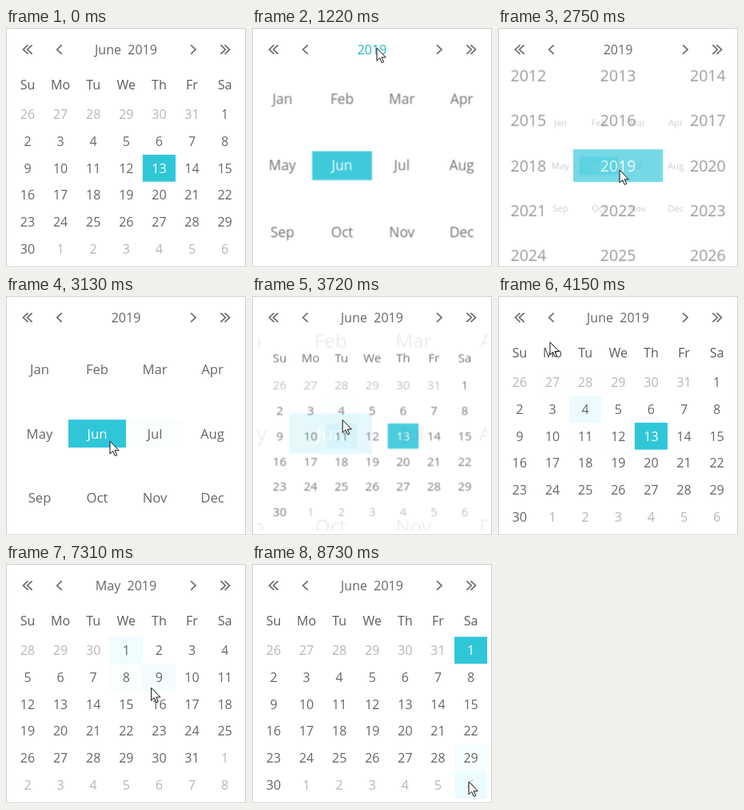
Animation, 300 px wide and 301 px high, one loop 9170 ms. Source, as an HTML page:

```html
<!DOCTYPE html>
<html lang="en">
<head>
<meta charset="utf-8">
<title>Calendar navigation</title>
<style>
  html, body { margin: 0; width: 100%; height: 100%; overflow: hidden; background: #fff; }
  svg { display: block; position: absolute; left: 0; top: 0; }
  text { font-family: "Open Sans", "Noto Sans", "Segoe UI", sans-serif; text-anchor: middle; white-space: pre; }
</style>
</head>
<body>
<svg id="stage" width="300" height="301" viewBox="0 0 300 301">
  <defs><clipPath id="body"><rect x="6" y="47" width="288" height="247"/></clipPath></defs>
  <rect width="300" height="301" fill="#fff"/>
  <rect x=".5" y=".5" width="299" height="299" fill="none" stroke="#d0d0d0"/>
  <g id="views" clip-path="url(#body)"></g>
  <g id="header" fill="none" stroke-width="1.6"></g>
  <path id="cursor" d="M0 0V16L3.7 12.6L6.3 18.5L8.7 17.5L6.1 11.8H11.2Z" fill="#fff" stroke="#111" stroke-linejoin="round"/>
</svg>
<script>
const LOOP = 9170, ZOOM = 400, LAST_HOVER = 8730;
const INK = '#666', MUTED = '#b6b6b6', ACCENT = '#2fc6d8', HOT = '#1fb4c4', HOVER = '#ebfbfe';
const CX = 150, CY = 172.6;
const $ = id => document.getElementById(id);

function el(parent, tag, attrs, label) {
  const node = document.createElementNS('http://www.w3.org/2000/svg', tag);
  for (const k in attrs) node.setAttribute(k, attrs[k]);
  if (label !== undefined) node.textContent = label;
  return parent.appendChild(node);
}
const set = (node, k, v) => node.setAttribute(k, v);
const show = (node, on) => set(node, 'visibility', on ? 'visible' : 'hidden');

function label(parent, x, y, size, str, fill) {
  return el(parent, 'text', { x, y: y + size * 0.357, 'font-size': size, fill }, str);
}

function makeView(title, singles) {
  return { title, singles, cells: [], g: el($('views'), 'g', { visibility: 'hidden' }) };
}
function addCell(view, x, y, w, h, size, str, color, key) {
  const box = el(view.g, 'rect', { x: x - w / 2, y: y - h / 2, width: w, height: h });
  const text = label(view.g, x, y, size, str, color);
  view.cells.push({ x, y, w, h, box, text, color, key });
}

function dayView(title, month) {
  const view = makeView(title, true);
  const colX = c => 27 + 41.1 * c;
  ['Su', 'Mo', 'Tu', 'We', 'Th', 'Fr', 'Sa'].forEach((d, c) => label(view.g, colX(c), 71.3, 16, d, '#5c5c5c'));
  const lead = new Date(Date.UTC(2019, month, 1)).getUTCDay();
  for (let i = 0; i < 42; i++) {
    const date = new Date(Date.UTC(2019, month, 1 - lead + i));
    const m = date.getUTCMonth(), d = date.getUTCDate();
    addCell(view, colX(i % 7), 108.2 + 33.8 * Math.floor(i / 7), 41.1, 33.8, 16, d,
      m === month ? INK : MUTED, m + '/' + d);
  }
  return view;
}
function gridView(title, singles, cols, rows, names) {
  const view = makeView(title, singles), w = 288 / cols, h = 242 / rows;
  names.forEach((name, i) => addCell(view, 6 + w * (i % cols + 0.5),
    CY + h * (Math.floor(i / cols) - (rows - 1) / 2), w, 35, 16.7, name, INK, name));
  return view;
}

const may = dayView('May  2019', 4);
const june = dayView('June  2019', 5);
const months = gridView('2019', true, 4, 3, 'Jan Feb Mar Apr May Jun Jul Aug Sep Oct Nov Dec'.split(' '));
const years = gridView('2012 - 2026', false, 3, 5, Array.from({ length: 15 }, (_, i) => String(2012 + i)));
const views = [may, june, months, years];

// Zoom direction: 1 goes up a level, -1 goes down, 0 switches at once.
const scenes = [
  [0, june, 0], [990, months, 1], [1900, years, 1], [2700, months, -1], [3520, june, -1],
  [4480, may, 0], [5700, june, 0], [6330, may, 0], [8120, june, 0]
];

// Pointer path: time, x, y.
const path = [
  [360, 180, 6], [800, 156, 25], [1630, 156, 25], [1760, 157, 16], [1900, 156, 25],
  [2220, 156, 25], [2620, 152, 178], [2780, 152, 178], [3130, 130, 182], [3370, 118, 180],
  [3580, 118, 180], [3760, 112, 150], [4020, 108, 138], [4150, 65, 58], [4390, 67, 26],
  [4600, 67, 26], [4980, 150, 8], [5340, 222, 14], [5600, 231, 27], [5890, 231, 27],
  [5930, 226, 28], [6250, 68, 28], [6400, 68, 28], [6730, 147, 102], [6940, 147, 102],
  [7840, 258, 246], [8060, 269, 246], [8410, 269, 246], [8550, 271, 273]
];

// Monotone cubic interpolation, so that holds stay still and turns are smooth.
const slope = (i, k) => (path[i + 1][k] - path[i][k]) / (path[i + 1][0] - path[i][0]);
function tangent(i, k) {
  if (i === 0 || i === path.length - 1) return 0;
  const a = slope(i - 1, k), b = slope(i, k);
  return a * b <= 0 ? 0 : 2 * a * b / (a + b);
}
function pointer(t) {
  if (t < path[0][0]) return null;
  const end = path[path.length - 1];
  if (t >= end[0]) return [end[1], end[2]];
  const i = path.findIndex(p => p[0] > t) - 1, d = path[i + 1][0] - path[i][0];
  const u = (t - path[i][0]) / d, v = 1 - u;
  return [1, 2].map(k => v * v * (1 + 2 * u) * path[i][k] + u * u * (3 - 2 * u) * path[i + 1][k]
    + d * u * v * (v * tangent(i, k) - u * tangent(i + 1, k)));
}

const chevron = (x, dir) => `M${x} 21.3l${6 * dir} 5.7l${-6 * dir} 5.7`;
const arrows = [
  { x: 6, d: chevron(27.5, -1) + chevron(32.7, -1) },
  { x: 47, d: chevron(69.7, -1), single: true },
  { x: 212, d: chevron(231, 1), single: true },
  { x: 253, d: chevron(268.3, 1) + chevron(273.5, 1) }
];
for (const a of arrows) a.node = el($('header'), 'path', { d: a.d });
const title = label($('header'), CX, 27, 16, '', INK);

const within = (p, x, y, w, h) => p && p[0] >= x && p[0] < x + w && p[1] >= y && p[1] < y + h;

function place(view, scale, opacity) {
  show(view.g, true);
  set(view.g, 'opacity', opacity);
  set(view.g, 'transform', `translate(${CX} ${CY}) scale(${scale}) translate(${-CX} ${-CY})`);
}

// Each hover tint follows the pointer with a short lag.
function hoverLevels(view, t, start) {
  const levels = new Map(), step = 10, tau = 200;
  const now = Math.min(t, LAST_HOVER);
  for (let lag = 0; lag < 900 && now - lag >= start; lag += step) {
    const p = pointer(now - lag);
    const hit = p && view.cells.find(c => within(p, c.x - c.w / 2, c.y - c.h / 2, c.w, c.h));
    if (hit) levels.set(hit, (levels.get(hit) || 0) + 1.6 * step / tau * Math.exp(-lag / tau));
  }
  return levels;
}

function paintCells(view, t, start) {
  const chosen = [t < 8120 ? '5/13' : '5/1', 'Jun', '2019'];
  const levels = hoverLevels(view, t, start);
  for (const c of view.cells) {
    const on = chosen.includes(c.key);
    set(c.box, 'fill', on ? ACCENT : HOVER);
    set(c.box, 'opacity', on ? 1 : Math.min(1, levels.get(c) || 0));
    set(c.text, 'fill', on ? '#fff' : c.color);
  }
}

function draw(t) {
  let n = scenes.length - 1;
  while (scenes[n][0] > t) n--;
  const [start, view, dir] = scenes[n];
  const p = 1 - Math.pow(1 - Math.min(1, (t - start) / ZOOM), 3);

  for (const v of views) show(v.g, false);
  if (dir < 0 && p < 1) {
    const old = scenes[n - 1][1];
    paintCells(old, t, t + 1);
    place(old, 1 + 0.5 * p, 1 - p);
  }
  paintCells(view, t, start);
  place(view, dir ? 1 + 0.5 * dir * (1 - p) : 1, dir ? p : 1);

  const tip = pointer(t);
  title.textContent = view.title;
  set(title, 'fill', within(tip, 88, 6, 124, 41) ? HOT : INK);
  for (const a of arrows) {
    show(a.node, !a.single || view.singles);
    set(a.node, 'stroke', within(tip, a.x, 6, 41, 41) ? HOT : INK);
  }
  show($('cursor'), tip);
  if (tip) set($('cursor'), 'transform', `translate(${tip[0]} ${tip[1]})`);
}

const origin = performance.now();
function tick() {
  draw((performance.now() - origin) % LOOP);
  requestAnimationFrame(tick);
}
tick();
</script>
</body>
</html>
```
